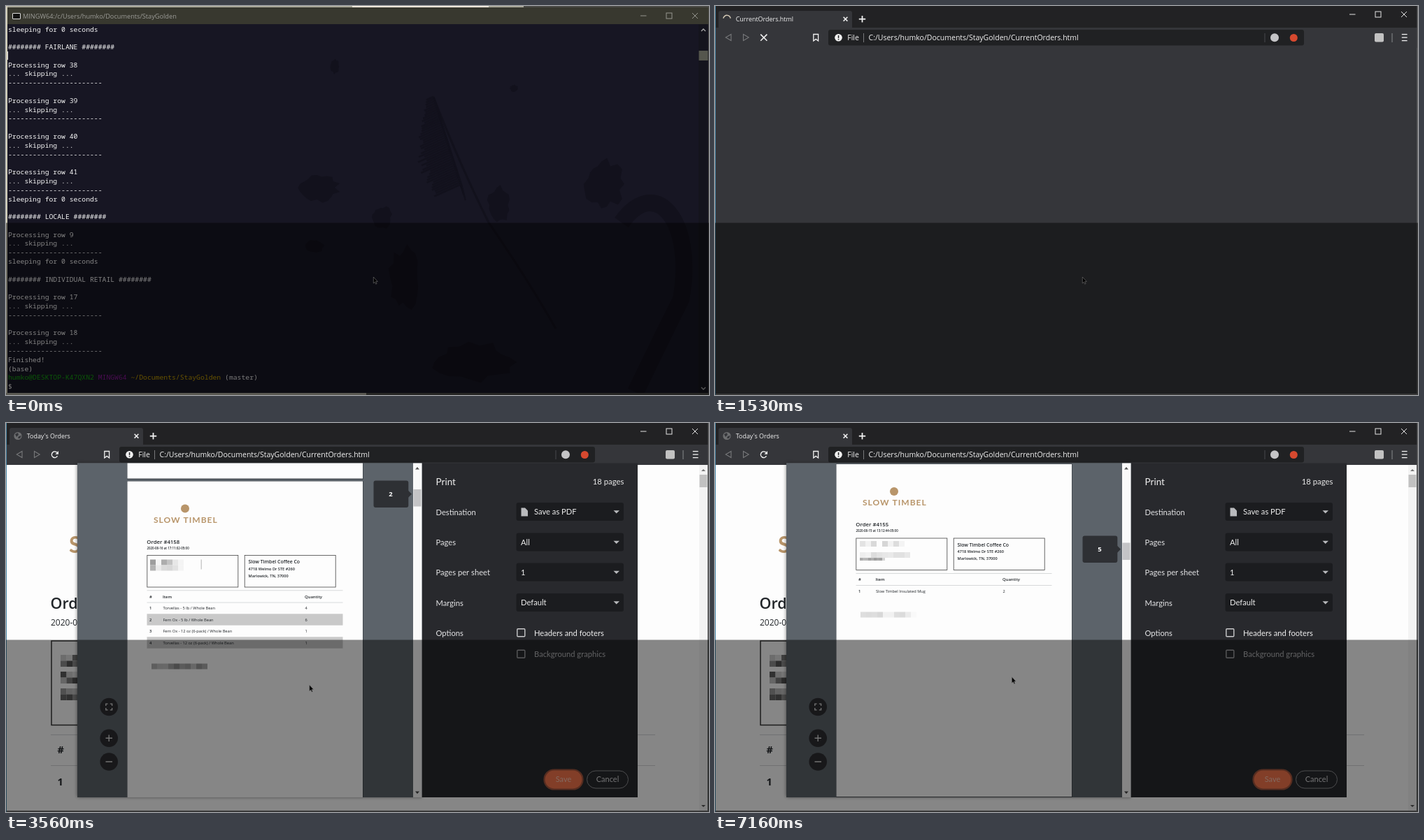
These frames come from a looping animation (1005x557 px, 8000 ms). An HTML page with a canvas:

```html
<!DOCTYPE html>
<html lang="en">
<head>
<meta charset="utf-8">
<title>Today's Orders</title>
<style>
html, body { margin: 0; width: 100%; height: 100%; overflow: hidden; background: #000; }
canvas { display: block; width: 1005px; height: 557px; }
</style>
</head>
<body>
<canvas id="stage"></canvas>
<script>
const W = 1005, H = 557, LOOP = 8000;
const canvas = document.getElementById('stage');
const dpr = window.devicePixelRatio || 1;
canvas.width = Math.round(W * dpr);
canvas.height = Math.round(H * dpr);
const c = canvas.getContext('2d');

const SANS = '"Open Sans", "Noto Sans", sans-serif';
const LATO = 'Lato, "Open Sans", sans-serif';
const MONO = '"Noto Sans Mono", "DejaVu Sans Mono", monospace';
const USER = 'humko', BRAND = 'Slow Timbel', GOLD = '#b8956a';

// ---- helpers ----
function rect(x, y, w, h, fill) {
  c.fillStyle = fill;
  c.fillRect(x, y, w, h);
}
function round(x, y, w, h, r, fill, stroke, lw = 1) {
  c.beginPath();
  c.roundRect(x, y, w, h, r);
  if (fill) { c.fillStyle = fill; c.fill(); }
  if (stroke) { c.strokeStyle = stroke; c.lineWidth = lw; c.stroke(); }
}
function box(x, y, w, h, stroke, lw = 1) {
  c.strokeStyle = stroke;
  c.lineWidth = lw;
  c.strokeRect(x, y, w, h);
}
function disc(x, y, r, fill) {
  c.beginPath();
  c.arc(x, y, r, 0, Math.PI * 2);
  c.fillStyle = fill;
  c.fill();
}
function trace(pts) {
  c.beginPath();
  for (let i = 0; i < pts.length; i += 2) c.lineTo(pts[i], pts[i + 1]);
}
function poly(pts, fill) {
  trace(pts);
  c.closePath();
  c.fillStyle = fill;
  c.fill();
}
function line(pts, stroke, lw = 1, closed) {
  trace(pts);
  if (closed) c.closePath();
  c.strokeStyle = stroke;
  c.lineWidth = lw;
  c.stroke();
}
function cross(x, y, r, color, lw) {
  line([x - r, y - r, x + r, y + r], color, lw);
  line([x - r, y + r, x + r, y - r], color, lw);
}
// y is the middle of the capitals
function text(s, x, y, size, color, o = {}) {
  c.font = `${o.weight || 400} ${size}px ${o.font || SANS}`;
  c.textAlign = o.align || 'left';
  c.letterSpacing = (o.gap || 0) + 'px';
  c.fillStyle = color;
  c.fillText(s, x, y + size * 0.36);
}
function noise(n) {
  const v = Math.sin(n * 127.1 + 11.7) * 43758.5453;
  return v - Math.floor(v);
}
function mosaic(x, y, cols, rows, size, seed, lo, hi) {
  for (let j = 0; j < rows; j++)
    for (let i = 0; i < cols; i++) {
      const g = Math.round(lo + (hi - lo) * noise(seed + i + j * cols));
      rect(x + i * size, y + j * size, size, size, `rgb(${g},${g},${g})`);
    }
}
function pointer(x, y) {
  const p = [0, 0, 0, 9, 2, 7.2, 3.4, 10.2, 4.8, 9.5, 3.4, 6.7, 6, 6.5];
  const at = p.map((v, i) => v + (i % 2 ? y : x));
  poly(at, '#000');
  line(at, 'rgba(255,255,255,.75)', 0.7, true);
}
function windowButtons(y, color) {
  line([907, y, 915.5, y], color);
  box(944, y - 4, 8, 8, color);
  cross(985, y, 4, color, 1);
}

// ---- terminal ----
const row = n => [`Processing row ${n}`, '... skipping ...', '-'.repeat(23)];
const head = s => ['', `######## ${s} ########`, ''];
const nap = 'sleeping for 0 seconds';
const LOG = [nap, ...head('FAIRLANE'),
  ...row(38), '', ...row(39), '', ...row(40), '', ...row(41), nap,
  ...head('LOCALE'), ...row(9), nap,
  ...head('INDIVIDUAL RETAIL'), ...row(17), '', ...row(18), 'Finished!', '(base)'];

const SHADE = '#12111c';
function blob(x, y, rx, ry, seed) {
  const pts = [];
  for (let i = 0; i < 22; i++) {
    const a = i / 22 * Math.PI * 2, k = 0.75 + 0.35 * noise(seed + i);
    pts.push(x + Math.cos(a) * rx * k, y + Math.sin(a) * ry * k);
  }
  poly(pts, SHADE);
}
function plants() {
  c.strokeStyle = SHADE;
  c.lineWidth = 3;
  c.beginPath();
  c.moveTo(611, 130);
  c.quadraticCurveTo(650, 230, 690, 310);
  c.quadraticCurveTo(745, 390, 786, 462);
  c.stroke();
  for (let i = 0; i < 42; i++) {
    const k = i / 41, x = 611 + 40 * k, y = 130 + 125 * k;
    const n = 10 + 36 * Math.min(1, k * 2) * (0.6 + 0.4 * noise(i));
    line([x, y, x - n, y + n * 0.45], SHADE, 2.6);
    line([x, y, x + n * 0.15, y + n * 0.6], SHADE, 2);
  }
  blob(448, 260, 28, 20, 3);
  blob(537, 303, 15, 17, 30);
  blob(470, 87, 7, 11, 60);
  blob(442, 344, 14, 9, 80);
  blob(570, 390, 22, 46, 100);
  blob(704, 285, 17, 27, 130);
  blob(726, 118, 6, 5, 160);
  blob(855, 255, 28, 36, 190);
  blob(670, 510, 58, 28, 220);
  c.strokeStyle = SHADE;
  c.lineWidth = 24;
  c.beginPath();
  c.moveTo(880, 310);
  c.bezierCurveTo(930, 240, 985, 310, 965, 420);
  c.quadraticCurveTo(930, 490, 900, 553);
  c.stroke();
}
function terminal(focused) {
  rect(0, 0, W, H, '#4a4a46');
  rect(0, 0, 740, 2, '#aaa89a');
  rect(495, 0, 195, 2, '#efe6da');
  rect(0, 0, 2, H, '#d2cfba');
  rect(0, 554, 515, 3, '#aaa89a');
  rect(2, 2, 1002, 552, '#171623');
  if (focused) {
    c.save();
    c.beginPath();
    c.rect(2, 26, 988, 528);
    c.clip();
    plants();
    c.restore();
  }
  rect(2, 2, 1002, 24, '#38382f');
  round(9.5, 10.5, 11, 8, 0.5, '#111', '#ddd');
  text(`MINGW64:/c/Users/${USER}/Documents/StayGolden`, 24, 15, 9.2, '#9c9c98');
  windowButtons(14, '#96968f');
  rect(990, 26, 13, 528, '#14141d');
  line([994, 36, 997, 33, 1000, 36], '#aaa', 1.3);
  line([994, 546, 997, 549, 1000, 546], '#aaa', 1.3);
  rect(990.5, 64, 13, 14, '#55564d');

  const size = 9.75, o = { font: MONO, weight: 500 }, y = i => 33 + i * 12.79;
  LOG.forEach((s, i) => text(s, 3, y(i), size, '#f6f6f6', o));
  const n = LOG.length;
  let col = 0;
  for (const [s, color] of [[USER + '@DESKTOP-K47QXN2 ', '#13a10e'], ['MINGW64 ', '#881798'],
    ['~/Documents/StayGolden ', '#c19c00'], ['(master)', '#e6e6e6']]) {
    text(s, 3 + col * 5.85, y(n), size, color, o);
    col += s.length;
  }
  text('$', 3, y(n + 1), size, '#e6e6e6', o);
  rect(2, 65, 1, 12, '#ddd');
}
function opening() {
  terminal(false);
  rect(9, 4, 986, 546.5, 'rgba(255,255,255,.68)');
  poly([492, 4, 752, 4, 735, 26, 522, 26], 'rgba(240,225,205,.5)');
  box(9, 4, 986, 546.5, 'rgba(35,60,110,.55)', 1);
}

// ---- browser ----
function chrome(loading, t) {
  const white = '#f1f1f1', bar = '#35363a';
  rect(0, 0, W, H, '#6b6b6b');
  rect(0, 0, 1003.5, 555, bar);
  rect(0, 0, 1003.5, 31, '#222224');
  round(5, 7, 191, 26, [3, 3, 0, 0], bar);
  rect(0, 31, 1003.5, 29, bar);
  if (loading) {
    const a = Math.PI * (1.05 + (t - 1530) / 700);
    c.beginPath();
    c.arc(17, 18.5, 5.2, a, a + Math.PI * 0.9);
    c.strokeStyle = '#d8ccb8';
    c.lineWidth = 1.5;
    c.stroke();
  } else {
    disc(17, 18.5, 5.6, '#6d6e70');
    poly([13, 16, 17, 14, 18, 17, 15, 20], bar);
    poly([18, 19, 22, 18, 20, 22, 17, 22], bar);
  }
  text(loading ? 'CurrentOrders.html' : "Today's Orders", 29.7, 18.7, 8.95, white);
  cross(186.5, 18.7, 2.9, white, 1.5);
  line([205.8, 18.7, 215.2, 18.7], white, 1.8);
  line([210.5, 14, 210.5, 23.4], white, 1.8);
  windowButtons(12, '#e4e4e4');

  line([23, 40.5, 23, 49.5, 15.3, 45], '#77787a', 1.1, true);
  line([40.5, 40.5, 40.5, 49.5, 48.2, 45], '#77787a', 1.1, true);
  if (loading) cross(69.8, 45.2, 4.6, white, 1.6);
  else {
    c.beginPath();
    c.arc(69.7, 45.2, 4.3, 0.5, 5.5);
    c.strokeStyle = white;
    c.lineWidth = 1.5;
    c.stroke();
    poly([75, 40, 75, 44.8, 70.4, 44.8], white);
  }
  line([140.8, 40.5, 147.6, 40.5, 147.6, 50, 144.2, 47.4, 140.8, 50], white, 1.3, true);
  round(162, 34, 680, 22.5, 3, '#202123');
  disc(176.5, 45.2, 5.3, white);
  rect(175.8, 42, 1.5, 4, '#202123');
  rect(175.8, 47, 1.5, 1.5, '#202123');
  text('File', 189.3, 45.5, 10.5, white);
  rect(212, 39, 1, 13, '#77787a');
  text(`C:/Users/${USER}/Documents/StayGolden/CurrentOrders.html`, 219.5, 45.5, 10.53, white);
  rect(785.5, 39, 1, 13, '#47484c');
  disc(800, 45.2, 6, '#c4c4c6');
  disc(827.3, 45.5, 5.5, '#d6492f');
  round(943, 39, 13, 12.5, 2, '#c2c2c2');
  rect(967.5, 39, 1, 13, '#88898b');
  for (const y of [40.6, 45.1, 49.6]) line([981.8, y, 989.6, y], white, 1.3);
  rect(0, 0, 1, H, '#4b88a8');
}
function wordmark(x, y, k) {
  disc(x + 45 * k, y - 16 * k, 6 * k, GOLD);
  text(BRAND.toUpperCase(), x, y, 12 * k, GOLD, { font: LATO, weight: 700, gap: k });
}
const SHOP = [BRAND + ' Coffee Co', '4718 Welmo Dr STE #260', 'Marlowick, TN, 37000'];

function webPage() {
  const ink = '#212529', semi = { weight: 600 }, bold = { weight: 700 };
  rect(1, 60, 1002, 495, '#fdfdfd');
  wordmark(90, 175, 2.65);
  text('Order #4159', 63.5, 258.5, 21.5, ink, semi);
  text('2020-08-16 at 19:24:51-05:00', 64, 285.5, 12, ink, { weight: 500 });
  box(65, 312, 404, 120.5, '#333', 1.5);
  box(496, 312, 404, 120.5, '#333', 1.5);
  for (let i = 0; i < 3; i++) mosaic(78, 332 + i * 24, 12, 2, 8.5, 7 + i * 40, 70, 225);
  SHOP.forEach((s, i) => text(s, 512, 338 + i * 25, i ? 14 : 17, ink, semi));
  for (const y of [446, 490]) rect(64, y, 864, 1, '#d2d4d6');
  [['#', 73.5], ['Item', 132], ['Quantity', 760]].forEach(a => text(a[0], a[1], 468, 14.5, ink, bold));
  [['1', 73.5], ['Torvellas - 5 lb / Whole Bean', 132], ['3', 760]]
    .forEach((a, i) => text(a[0], a[1], 513.5, 14.5, ink, i ? {} : bold));
  rect(991, 60, 12, 495, '#f3f3f3');
  rect(991.5, 74, 11, 18, '#c1c1c1');
  poly([994, 69, 1000, 69, 997, 66], '#777');
  poly([994, 547, 1000, 547, 997, 550], '#555');
}

// ---- print dialog ----
const LB = ' - 5 lb / Whole Bean', PACK = ' - 12 oz (6-pack) / Whole Bean';
const A = 'Torvellas', B = 'Fern Ox', D = 'Wesso Tulka';
const ORDERS = [
  { no: 4159, at: '16 at 19:24:51', x: 224, qx: 427, rows: [[A + LB, 3], [D + LB, 2]] },
  { no: 4158, at: '16 at 17:11:02', x: 224, qx: 427, rows: [[A + LB, 4], [B + LB, 6], [B + PACK, 1], [A + PACK, 1]] },
  { no: 4157, at: '16 at 12:56:25', x: 223, qx: 429.5, rows: [[D + LB, 2], [D + PACK, 2], [A + LB, 1], [A + PACK, 2]] },
  { no: 4156, at: '15 at 14:38:09', x: 224, qx: 427, rows: [[B + LB, 2], [A + LB, 1]] },
  { no: 4155, at: '15 at 13:12:44', x: 229.5, qx: 411, rows: [[BRAND + ' Insulated Mug', 2]] }
];
const PAGE_H = 476, PITCH = 480;

function hidden(n, y) {
  if (n === 1) {
    mosaic(206, y + 112, 6, 2, 8, 3, 150, 245);
    rect(278.5, y + 112, 1.5, 14, '#ccc');
  } else if (n === 4) {
    mosaic(207, y + 110, 9, 1, 8, 21, 205, 255);
    mosaic(207, y + 126, 9, 1, 8, 33, 215, 250);
    mosaic(207, y + 134, 9, 1, 4, 40, 150, 220);
  } else {
    mosaic(204.5, y + 110, 5, 1, 8, 51, 215, 255);
    mosaic(204.5, y + 126, 6, 1, 8, 61, 205, 250);
    mosaic(204.5, y + 134, 3, 1, 8, 68, 170, 240);
    mosaic(212, y + 142, 16, 1, 5, 71, 130, 215);
  }
}
function sheet(n, y) {
  const o = ORDERS[n], ink = '#212529', bold = { weight: 600 };
  rect(173, y - 0.5, 338, PAGE_H + 2, '#454b51');
  rect(173.5, y, 336.5, PAGE_H, '#fdfdfd');
  if (!o) return;
  wordmark(211, y + 55, 1);
  text('Order #' + o.no, 201.3, y + 86.5, 7.8, ink, bold);
  text(`2020-08-${o.at}-05:00`, 201.5, y + 95.8, 4.45, ink, bold);
  box(201.8, y + 106, 130, 45.5, '#444', 0.8);
  box(341.2, y + 106, 130, 45.5, '#444', 0.8);
  hidden(n, y);
  SHOP.forEach((s, i) => text(s, 346.5, y + 115.5 + i * 9.8, i ? 5.6 : 6.9, ink, bold));
  rect(201.5, y + 156, 280, 0.7, '#c8cacc');
  rect(201.5, y + 173.2, 280, 0.7, '#c8cacc');
  text('#', 205, y + 165, 5.9, ink, bold);
  text('Item', o.x, y + 165, 5.9, ink, bold);
  text('Quantity', o.qx, y + 165, 5.9, ink, bold);
  o.rows.forEach(([item, qty], i) => {
    const ry = y + 181.5 + i * 16.5;
    if (i % 2) rect(201.5, ry - 8.2, 280, 16.4, '#c9c9c9');
    text(i + 1, 205, ry, 5.7, ink, bold);
    text(item, o.x + 0.4, ry, 5.7, ink);
    text(qty, o.qx + 0.4, ry, 5.7, ink);
  });
  const end = y + 195 + o.rows.length * 16.5;
  const light = n === 4;
  mosaic(208, end, n === 2 ? 8 : 10, 1, 8, 90 + n * 12, light ? 215 : 140, light ? 252 : 200);
}
function dialogShape(l1, l2, r1, r2, m1, m2, top, bottom, alpha) {
  c.save();
  c.shadowColor = 'rgba(0,0,0,.55)';
  c.shadowBlur = 5 * dpr;
  c.globalAlpha = alpha;
  poly([l1, top, m1, top, m2, bottom, l2, bottom], '#606469');
  c.shadowColor = 'transparent';
  poly([m1, top, r1, top, r2, bottom, m2, bottom], '#28292d');
  c.restore();
}
function dropdown(y, label, value, x = 736) {
  const o = { font: LATO };
  text(label, 614.5, y + 0.5, 11.2, '#e3e3e5', o);
  round(729.5, y - 13, 153.5, 26, 3, '#1b1c1f');
  text(value, x, y, 11.2, '#eee', o);
  poly([868.5, y - 1.8, 877, y - 1.8, 872.7, y + 2.6], '#b9babd');
}
function controls() {
  const o = { font: LATO }, mid = { font: LATO, align: 'center' };
  text('Print', 614.5, 84, 13.5, '#eee', o);
  text('18 pages', 883.3, 84, 11.3, '#e8e8e8', { font: LATO, align: 'right' });
  dropdown(127, 'Destination', 'Save as PDF', 755);
  poly([736.5, 121.5, 742, 121.5, 746, 125.5, 746, 133.5, 736.5, 133.5], '#b9babd');
  dropdown(170.5, 'Pages', 'All');
  dropdown(213.5, 'Pages per sheet', '1');
  dropdown(257, 'Margins', 'Default');
  text('Options', 614.5, 300.5, 11.2, '#e3e3e5', o);
  round(730.8, 294.8, 11, 11, 1, null, '#c9c9cb', 1.4);
  text('Headers and footers', 755, 300.5, 11.2, '#eee', o);
  round(730.8, 325.3, 11, 11, 1, null, '#a5a6a9', 1.4);
  text('Background graphics', 755, 331, 11.2, '#b8b9bc', o);
  round(769.5, 496.5, 55, 28, 14, '#f4744c', '#a2543d', 2.2);
  text('Save', 797, 510.5, 11, '#f7c6b2', mid);
  round(830.5, 498, 59, 25, 12.5, null, '#8e8f92', 1);
  text('Cancel', 860, 510.5, 11, '#dcdcde', mid);
}
function zoomButtons() {
  const ink = '#d6d6d6';
  for (const y of [406.5, 451.3, 485]) disc(147.2, y, 12.8, '#2d2e31');
  for (const sx of [-1, 1])
    for (const sy of [-1, 1])
      line([147.2 + sx * 4.4, 406.5 + sy * 1.6, 147.2 + sx * 4.4, 406.5 + sy * 4.4,
        147.2 + sx * 1.6, 406.5 + sy * 4.4], ink, 1.4);
  line([142.5, 451.3, 152, 451.3], ink, 1.4);
  line([147.2, 446.5, 147.2, 456], ink, 1.4);
  line([142.5, 485, 152, 485], ink, 1.4);
}
function preview(n, top) {
  c.save();
  c.beginPath();
  c.rect(102, 57.5, 493, 478.5);
  c.clip();
  rect(102, 57, 493, 480, '#5c636a');
  for (let i = n - 1; i <= n + 1; i++) if (i >= 0) sheet(i, top + (i - n) * PITCH);
  rect(582, 57, 12.5, 480, '#fafafa');
  rect(582.5, 95 + 25.5 * (n - 1), 11, 24.5, '#c4c4c6');
  poly([585, 66.5, 591, 66.5, 588, 63], '#555');
  poly([585, 527.5, 591, 527.5, 588, 531], '#444');
  zoomButtons();
  if (n) {
    const y = 101.8 + 26.3 * (n - 1);
    round(525.5, y - 19.3, 49.8, 38.6, 3, '#2e3034');
    poly([575, y - 5, 580, y, 575, y + 5], '#2e3034');
    text(n + 1, 550, y, 9.5, '#fff', { weight: 700, align: 'center' });
  }
  c.restore();
}

// [start, page index, page top, pointer x, pointer y]
const STOPS = [
  [2360, 0, 62, 758.5, 415.5],
  [3560, 1, 83.5, 433.7, 375],
  [4760, 2, 57.5, 429.2, 365.5],
  [5960, 3, 58, 426.5, 364.5],
  [7160, 4, 59, 424.3, 363.5]
];

function draw(t) {
  c.setTransform(dpr, 0, 0, dpr, 0, 0);
  let px = 525.3, py = 388;
  if (t < 1200) terminal(true);
  else if (t < 1380) opening();
  else if (t < 1530) {
    rect(0, 0, W, H, '#4a4a46');
    rect(0, 0, 1004, 556, '#fafafa');
    box(0.5, 0.5, 1003, 555, '#4b88a8');
  } else if (t < 1660) chrome(true, t);
  else {
    chrome(false, t);
    webPage();
    if (t < 1960) {
      px = t < 1820 ? 520 : 517;
      py = 386;
    } else {
      px = 758.5;
      py = 415.5;
      if (t < 2080) dialogShape(103, 95, 902, 909.5, 594, 596, 54.5, 541.5, 0.975);
      else dialogShape(102, 102, 903, 903, 595, 595, 57.5, 536, 1);
      if (t >= 2230) controls();
      const stop = STOPS.filter(s => t >= s[0]).pop();
      if (stop) {
        preview(stop[1], stop[2]);
        [px, py] = stop.slice(3);
      }
    }
  }
  pointer(px, py);
  rect(0, 310.5, W, H - 310.5, 'rgba(0,0,0,.47)');
}

const start = performance.now();
function tick() {
  draw((performance.now() - start) % LOOP);
  requestAnimationFrame(tick);
}
tick();
</script>
</body>
</html>
```
